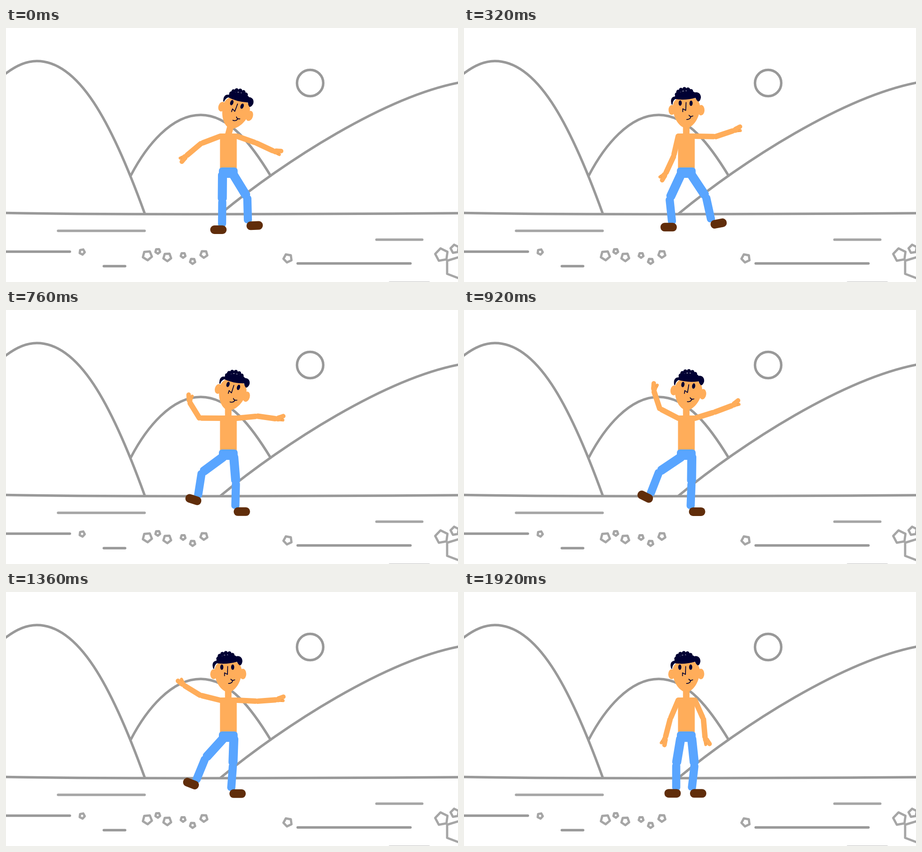
An HTML page with a canvas for the animation above (1.96 s loop, 998x561 px).

```html
<!DOCTYPE html>
<html lang="en">
<head>
<meta charset="utf-8">
<title>Dancer</title>
<style>
html, body { margin: 0; height: 100%; overflow: hidden; background: #fff; }
canvas { display: block; }
</style>
</head>
<body>
<canvas id="stage" width="998" height="561"></canvas>
<script>
const ctx = document.getElementById('stage').getContext('2d');
const SKIN = '#ffad5a', JEANS = '#59a5ff', SHOE = '#602d0a', HAIR = '#000033';
const GREY = '#999', PALE = '#a6a6a6';
const LOOP = 1960, STEP = 40;
const LEFT = -1, RIGHT = 1;

// Key poses in degrees: each limb is [angle, bend of its middle joint].
const poses = [
  { at: 0, head: [15, 4], armL: [159, -19], armR: [19.5, 5.5], legL: [90.5, 0], legR: [58.5, 30] },
  { at: 160, head: [0, -28], armL: [73, -58], armR: [-13, -82], legL: [90.5, 0], legR: [37, 28] },
  { at: 480, head: [0, 30], armL: [133, 82], armR: [15, 43], legL: [139.5, -62], legR: [76, 14] },
  { at: 1080, head: [0, 0], armL: [234.5, 30.5], armR: [-29, -20], legL: [148.5, -25], legR: [96, -3] },
  { at: 1920, head: [0, 0], armL: [113, -8.5], armR: [66, 19], legL: [99.5, -9.5], legR: [84, 12.5] }
];

const rad = deg => deg * Math.PI / 180;
const mix = (a, b, k) => a + (b - a) * k;
const along = ([x, y], deg, len) => [x + len * Math.cos(rad(deg)), y + len * Math.sin(rad(deg))];

function poseAt(t) {
  const next = Math.max(1, poses.findIndex(p => p.at >= t));
  const a = poses[next - 1], b = poses[next];
  const k = (t - a.at) / (b.at - a.at);
  return part => a[part].map((v, i) => mix(v, b[part][i], k));
}

function stroke(d, color, width) {
  ctx.strokeStyle = color;
  ctx.lineWidth = width;
  ctx.stroke(new Path2D(d));
}
function fill(d, color) {
  ctx.fillStyle = color;
  ctx.fill(new Path2D(d));
}
function box(x, y, w, h, r, color) {
  ctx.fillStyle = color;
  ctx.beginPath();
  ctx.roundRect(x, y, w, h, r);
  ctx.fill();
}
function oval(x, y, rx, ry, color) {
  ctx.fillStyle = color;
  ctx.beginPath();
  ctx.ellipse(x, y, rx, ry, 0, 0, 7);
  ctx.fill();
}
function turned([x, y], deg, draw) {
  ctx.save();
  ctx.translate(x, y);
  ctx.rotate(rad(deg));
  draw();
  ctx.restore();
}

function stone([x, y, r]) {
  const p = new Path2D();
  for (let i = 0; i < 5; i++) p.lineTo(...along([x, y], x / 22 + i * 72, r));
  p.closePath();
  stroke(p, PALE, 5);
}

function scenery() {
  ctx.fillStyle = '#fff';
  ctx.fillRect(0, 0, 998, 561);
  stroke('M-5 104C20 84 45 73 68 73C160 73 232 205 306 409', GREY, 5.5);
  stroke('M276 325C310 260 365 192 430 192C495 192 545 262 584 326', GREY, 5.5);
  stroke('M474 410C615 294 838 151 1003 120', GREY, 5.5);
  stroke('M-5 408.5C150 412 600 412 1003 409', GREY, 5.5);
  stroke('M700.5 121.5a29 29 0 1 0-58 0a29 29 0 1 0 58 0', GREY, 5.5);
  stroke('M-5 494H141M216 526H263M644 520H893', GREY, 5.5);
  stroke('M115 448H306M818 467.5H919M847 563H934', PALE, 5.5);
  [[168, 494.5, 6], [312, 502.5, 10.5], [335, 493, 5.5], [356, 506, 9], [391, 502, 5.5],
   [412, 515, 6], [437, 499.5, 8], [622, 508.5, 9.5], [962, 501, 14.5], [991, 488, 9.5]].forEach(stone);
  stroke('M1003 505L974 514V543L1003 554', PALE, 5);
}

function leg(side, [thigh, bend]) {
  const hip = [490.5 + side * 12.5, 325.5], shin = thigh + bend;
  const knee = along(hip, thigh, 57), ankle = along(knee, shin, 57);
  // The foot tips outwards as the leg swings away from the hip.
  const reach = Math.abs(ankle[0] - hip[0]);
  const tilt = -side * 0.65 * Math.max(0, reach - 27);
  turned(hip, thigh, () => box(-8, -10, 66, 20, 7, JEANS));
  turned(knee, shin, () => box(-5, -9, 62, 18, 7, JEANS));
  turned(ankle, tilt, () => box(side * 11.25 - 14.75, -3.5, 36, 19, 9, SHOE));
}

function arm(side, [upper, bend]) {
  const shoulder = [491.5 + side * 18.5, 239], fore = upper + bend;
  const elbow = along(shoulder, upper, 46), wrist = along(elbow, fore, 42);
  const hand = fore - side * bend / 2 - 10 * (1 + side);
  turned(shoulder, upper, () => box(-6, -6, 53, 12, 6, SKIN));
  turned(elbow, fore, () => box(-5, -6, 49, 12, 5, SKIN));
  turned(wrist, hand, () => {
    oval(5, 0.5, 9, 6.5, SKIN);
    stroke('M5 -1H16', SKIN, 10);
    stroke('M6 4L12.5 7', SKIN, 6.5);
    stroke('M9 4L14 4.5M7 7L11 7.5', '#ec9a48', 0.9);
  });
}

function face() {
  oval(458.5, 181.5, 7.5, 11, SKIN);
  oval(523, 181, 7.5, 11.5, SKIN);
  fill('M460.5 174C460.5 142 520.5 142 520.5 174C520.5 200 504 221 491 221C477 221 460.5 200 460.5 174', SKIN);
  fill('M466 152C458 151 455 158 456.5 165Q457 170 459.5 170Q460 161 466 157Z', HAIR);
  fill('M463 157C463 150 470 142 487 139C499 140 505 142 509 142C517 140 522 146 522 153C521 159 519 162 516 162Q512 159 510 154Q486 161 463 157', HAIR);
  for (let a = 190; a <= 340; a += 25) {
    oval(487 + 18.5 * Math.cos(rad(a)), 150 + 15 * Math.sin(rad(a)), 4.5, 4.8, HAIR);
  }
  for (const x of [476.5, 500.5]) oval(x, 166, 3.5, 6, HAIR);
  stroke('M489.5 164.5L489 182L482.5 178.5V185', HAIR, 1.8);
  stroke('M496.5 192.5Q499 197 505 194M491.5 202Q499 202 500.5 196', HAIR, 1.8);
}

function head([neck, nod]) {
  turned([490.5, 236], neck, () => {
    box(-7, -28, 14.5, 32, 2, SKIN);
    turned([-1, -22], nod, () => {
      ctx.translate(-489.5, -214);
      face();
    });
  });
}

function dancer(pose) {
  leg(LEFT, pose('legL'));
  leg(RIGHT, pose('legR'));
  box(472.5, 233, 37, 80, 1, SKIN);
  box(470, 308, 41.5, 23, 7, JEANS);
  arm(LEFT, pose('armL'));
  arm(RIGHT, pose('armR'));
  head(pose('head'));
}

function frame() {
  const t = performance.now() % LOOP;
  ctx.lineCap = ctx.lineJoin = 'round';
  scenery();
  dancer(poseAt(Math.floor(t / STEP) * STEP));
  requestAnimationFrame(frame);
}
frame();
</script>
</body>
</html>
```
